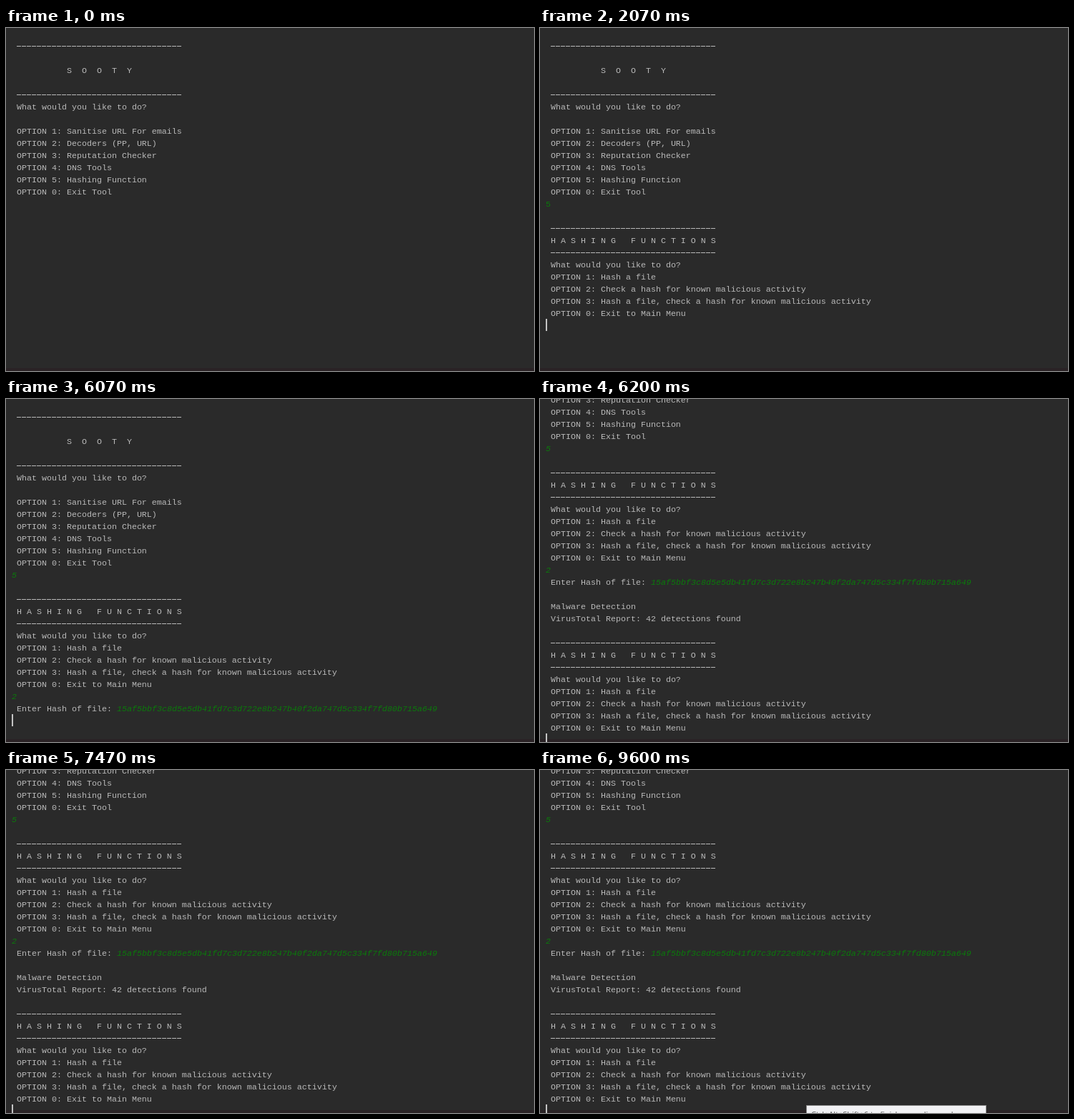
An HTML page with a canvas for the animation above (9.67 s loop, 738x480 px).

```html
<!DOCTYPE html>
<html lang="en">
<head>
<meta charset="utf-8">
<title>Console session</title>
<style>
html, body { margin: 0; width: 100%; height: 100%; overflow: hidden; background: #2a2a2a; }
canvas { display: block; }
</style>
</head>
<body>
<canvas id="stage" width="738" height="480"></canvas>
<script>
const ctx = document.getElementById('stage').getContext('2d');
const LOOP = 9670, W = 738, H = 480;
const LEFT = 8, CHAR = 7, LINE = 17, TOP = 16;
const FONT = '11.667px "Liberation Mono", monospace';
const GREY = '#b9b9b9', GREEN = '#0b7a0b';
const HASH = '15af5bbf3c8d5e5db41fd7c3d722e8b247b40f2da747d5c334f7fd80b715a649';
const RULE = '-'.repeat(33);

const mainMenu = [
  RULE, '', '          S  O  O  T  Y', '', RULE,
  'What would you like to do?', '',
  'OPTION 1: Sanitise URL For emails',
  'OPTION 2: Decoders (PP, URL)',
  'OPTION 3: Reputation Checker',
  'OPTION 4: DNS Tools',
  'OPTION 5: Hashing Function',
  'OPTION 0: Exit Tool'
];
const hashMenu = [
  RULE, 'H A S H I N G   F U N C T I O N S', RULE,
  'What would you like to do?',
  'OPTION 1: Hash a file',
  'OPTION 2: Check a hash for known malicious activity',
  'OPTION 3: Hash a file, check a hash for known malicious activity',
  'OPTION 0: Exit to Main Menu'
];

// Blocks of console output: start time, first row, lines
const output = [
  [0, 0, mainMenu],
  [2070, 15, hashMenu],
  [4000, 24, ['Enter Hash of file:']],
  [6200, 26, ['Malware Detection', 'VirusTotal Report: 42 detections found', '', ...hashMenu]]
];

// Typed input: start time, row, column, text, time it turns italic
const input = [
  [1070, 13, 0, '5', 2140],
  [3000, 23, 0, '2', 3000],
  [4800, 24, 21, HASH, 4800]
];

// Caret moves: start time, row, column; null hides it
const caret = [
  [0, null], [400, 13, 0], [1070, 13, 1], [1670, null], [1870, 14, 0],
  [2070, 23, 0], [2670, null], [3000, 23, 1], [3670, null], [3800, 24, 0],
  [4000, 24, 21], [4730, null], [4800, 24, 85], [5400, null], [5670, 25, 0],
  [6200, 37, 0]
];
const BLINK = 533, BLINK_FROM = 6600;

const rowTop = row => TOP + row * LINE + (row > 25 ? 0 : 0);

function drawLine(row, text) {
  const y = rowTop(row), x = LEFT + CHAR;
  ctx.fillStyle = GREY;
  if (text === RULE) {
    for (let i = 0; i < RULE.length; i++) ctx.fillRect(x + i * CHAR, y + 9, 6, 1);
  } else {
    ctx.fillText(text, x, y + 13);
  }
}

function drawInput(t, [start, row, col, text, slant]) {
  if (t < start) return;
  ctx.font = (t >= slant ? 'italic ' : '') + FONT;
  ctx.fillStyle = GREEN;
  ctx.fillText(text, LEFT + col * CHAR, rowTop(row) + 13);
}

function drawCaret(t) {
  const [, row, col] = caret.findLast(step => t >= step[0]);
  const hidden = t >= BLINK_FROM && Math.floor((t - BLINK_FROM) / BLINK) % 2 === 0;
  if (row === null || hidden) return;
  ctx.fillStyle = '#c4c4c4';
  ctx.fillRect(Math.max(LEFT, LEFT - 1 + col * CHAR), rowTop(row), 2, LINE);
}

function drawTip(t) {
  if (t < 9330) return;
  const y = 480 - Math.round(11 * Math.min(1, (t - 9270) / 330));
  ctx.fillStyle = '#8a8a8a';
  ctx.fillRect(372, y, 252, 30);
  ctx.fillStyle = '#f1f1f4';
  ctx.fillRect(373, y + 1, 250, 29);
  ctx.fillStyle = '#5a5a5a';
  ctx.font = '11px "Open Sans", sans-serif';
  ctx.fillText('Ctrl+Alt+Shift+6 to finish recording and', 379, y + 17);
}

function draw(t) {
  ctx.fillStyle = '#2a2a2a';
  ctx.fillRect(0, 0, W, H);
  ctx.fillStyle = '#2a2225';
  ctx.fillRect(0, 476, W, 4);

  ctx.save();
  if (t >= 6200) ctx.translate(0, -177);
  ctx.font = FONT;
  for (const [start, row, lines] of output) {
    if (t >= start) lines.forEach((text, i) => drawLine(row + i, text));
  }
  input.forEach(item => drawInput(t, item));
  drawCaret(t);
  ctx.restore();
  drawTip(t);
}

const begin = performance.now();
function tick() {
  draw((performance.now() - begin) % LOOP);
  requestAnimationFrame(tick);
}
tick();
</script>
</body>
</html>
```
